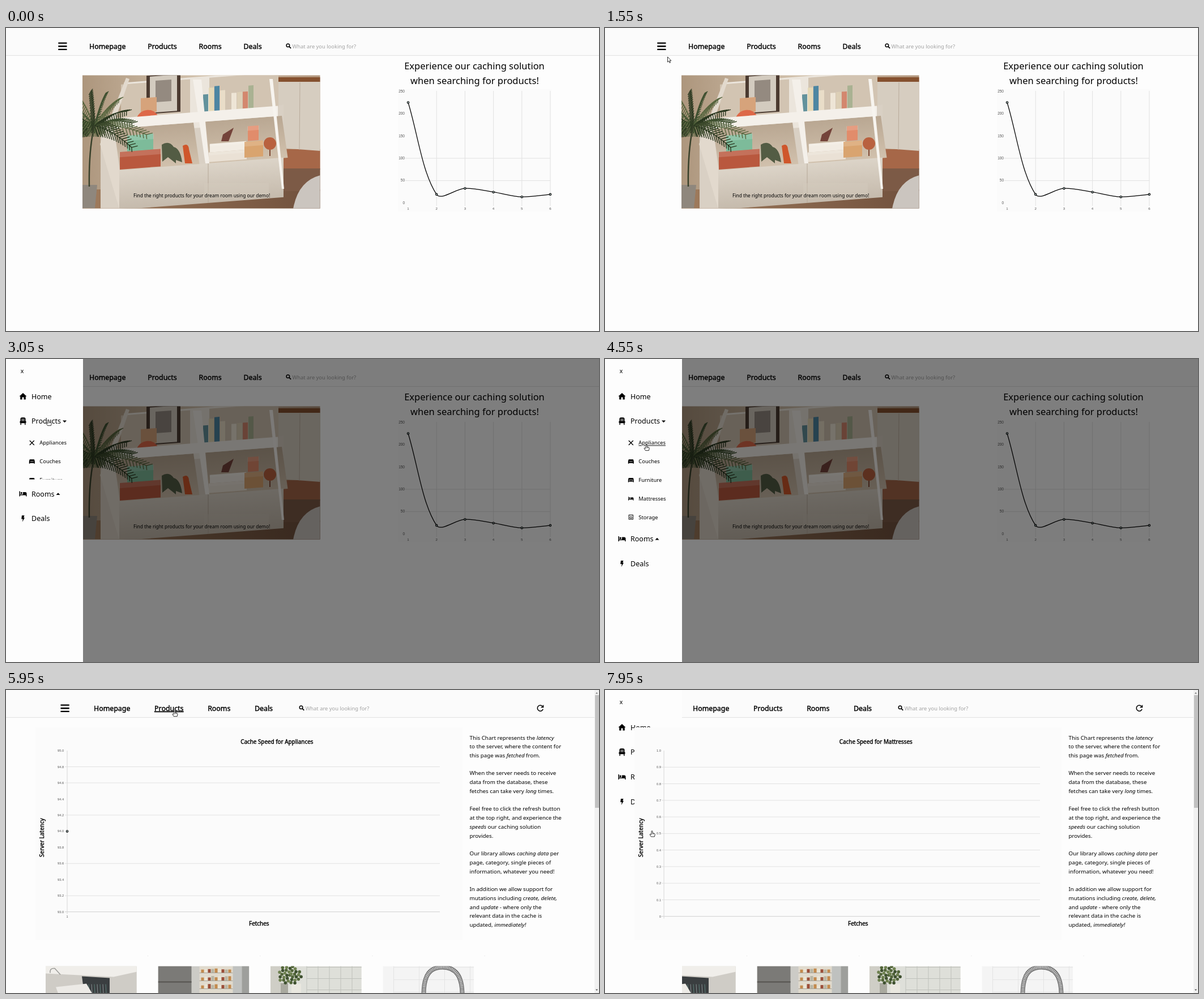
Animation, 1047 px wide and 535 px high, one loop 8000 ms. Source, as an HTML page:

```html
<!DOCTYPE html>
<html lang="en">
<head>
<meta charset="utf-8">
<title>Shop demo with cached fetches</title>
<style>
html, body { margin: 0; width: 100%; height: 100%; overflow: hidden; background: #fdfdfd; }
svg { display: block; width: 100vw; height: 100vh; font-family: "Noto Sans", "Open Sans", sans-serif; }
.tick { font-family: "Liberation Sans", Arial, sans-serif; fill: #555; }
.strong { stroke: #000; stroke-width: .4; }
.hover { text-decoration: underline; }
</style>
</head>
<body>
<svg id="stage" viewBox="0 0 1047 535"></svg>
<script>
const LOOP = 8000, DRAWER = 136;
const clamp = v => Math.max(0, Math.min(1, v));
const ease = v => v * v * (3 - 2 * v);
const ramp = (t, from, length) => ease(clamp((t - from) / length));
// Switches on and off in turn, starting at each given time
const toggle = (t, length, ...times) => times.reduce((v, from, i) => v + (i % 2 ? -1 : 1) * ramp(t, from, length), 0);

function seeded(seed) {
  return () => (seed = (seed * 16807) % 2147483647) / 2147483647;
}

// Markup helpers
const rect = (x, y, w, h, fill, more = '') => `<rect x="${x}" y="${y}" width="${w}" height="${h}" fill="${fill}" ${more}/>`;
const line = (x1, y1, x2, y2, color = '#e1e1e1', w = 1) =>
  `<line x1="${x1}" y1="${y1}" x2="${x2}" y2="${y2}" stroke="${color}" stroke-width="${w}"/>`;
const path = (d, fill = '#000', more = '') => `<path d="${d}" fill="${fill}" ${more}/>`;
const stroke = (d, color, w, more = '') => path(d, 'none', `stroke="${color}" stroke-width="${w}" ${more}`);
const circle = (x, y, r, fill, more = '') => `<circle cx="${x}" cy="${y}" r="${r}" fill="${fill}" ${more}/>`;
const text = (x, y, size, s, more = '') => `<text x="${x}" y="${y}" font-size="${size}" ${more}>${s}</text>`;
const group = (transform, s) => `<g transform="${transform}">${s}</g>`;
const at = (x, y, s) => group(`translate(${x} ${y})`, s);
const range = (n, f) => Array.from({ length: n }, (_, i) => f(i)).join('');
const clip = (id, x, y, w, h, s) => `<clipPath id="${id}">${rect(x, y, w, h, '#000')}</clipPath><g clip-path="url(#${id})">${s}</g>`;
const gradient = (id, colors, dir = '') => `<linearGradient id="${id}" ${dir}>` +
  colors.map((c, i) => `<stop offset="${i / (colors.length - 1)}" stop-color="${c}"/>`).join('') + '</linearGradient>';
const dot = (x, y) => circle(x, y, 1.7, '#b9cfcd', 'stroke="#000" stroke-width="1.1"');
const middle = 'text-anchor="middle"', end = 'text-anchor="end"';

// Header: entries spaced by one gap, as in a flex row
const pen = document.createElement('canvas').getContext('2d');
pen.font = '12.4px "Noto Sans", "Open Sans", sans-serif';

function navLayout(x, gap) {
  const items = ['Homepage', 'Products', 'Rooms', 'Deals'].map(name => {
    const w = pen.measureText(name).width, item = { name, x, w };
    x += w + gap;
    return item;
  });
  return { items, bar: items[0].x - gap - 16, search: x + 4 };
}
const NAV = { home: navLayout(147, 38.8), shop: navLayout(155, 42.6) };

function header(page) {
  const { items, bar, search } = NAV[page];
  return rect(0, 0, 1047, 48, '#fbfbfb') + line(0, 48.5, 1047, 48.5, '#e2e2e2') +
    range(3, i => rect(bar, 25.4 + i * 5.7, 15.4, 2.3, '#000', 'rx=".7"')) +
    items.map((n, i) => text(n.x, 36.8, 12.4, n.name, `class="strong" id="${page}${i}"`)).join('') +
    at(search, 31, circle(3.4, -.3, 2.8, 'none', 'stroke="#000" stroke-width="1.5"') + line(5.4, 1.7, 8.6, 4.8, '#000', 1.8)) +
    text(search + 11, 35.5, 9.36, 'What are you looking for?', 'fill="#a2a2a2"');
}

// Home page
function palm() {
  const rnd = seeded(11);
  return range(13, n => {
    const turn = Math.PI * (1.12 - n / 10), len = 62 + 42 * rnd();
    const dx = Math.cos(turn) * len, dy = -Math.sin(turn) * len;
    const leaves = range(16, k => {
      const s = k / 15, x = dx * s, y = dy * s + 22 * s * s, size = 20 - 12 * s;
      return `M${x} ${y}l${dx / len * size * .6 - 4} ${size}M${x} ${y}l${dx / len * size + 3} ${-size * .35}`;
    });
    return at(156, 172, stroke(`M0 0Q${dx / 2} ${dy / 2} ${dx} ${dy + 22}${leaves}`, ['#2b3820', '#3f5030', '#56643d'][n % 3], 1.4));
  }) + stroke('M147 280Q146 215 156 172', '#38402a', 2.5);
}

// One row of books or boxes with seeded sizes
function row(x, floor, n, w, h, colors, seed) {
  const rnd = seeded(seed);
  return range(n, i => {
    const tall = h * (.65 + .35 * rnd());
    return rect(x + i * w, floor - tall, w - 1, tall, colors[i % colors.length]);
  });
}
const pile = (x, floor, w, h, color) => rect(x, floor - h, w, h, color) + rect(x - 1, floor - h, w + 2, h * .3, '#fff', 'opacity=".15"');

function shelf() {
  const bays = [-9, 147];
  return rect(-33, 158, 323, 161, '#d9d0c4') + rect(8, 97, 266, 90, '#ebe5dc') +
    bays.map(x => rect(x + 12, 100, 122, 60, '#d2c4b2') +
      at(x, 177, group('skewX(8)', rect(0, 0, 140, 75, 'url(#bay)')))).join('') +
    rect(248 - 200, 88, 60, 68, '#4b3a30') + rect(54, 90, 48, 64, '#d3cbbf') + rect(64, 98, 28, 38, '#948a80') +
    rect(38, 127, 28, 26, '#d6a37b') + path('M29 169a20 20 0 0 1 41 0Z', '#dd6848') +
    row(148, 160, 4, 10, 48, ['#63929c', '#e5d9b7', '#4d86a2', '#e9ddc8'], 5) + row(198, 160, 4, 10, 46, ['#eee5d6', '#dccfb6', '#d3876e', '#a9b292'], 8) +
    rect(-12, 159, 292, 18, '#f4f0ea') + rect(0, 251, 290, 70, 'url(#front)') + line(157, 251, 157, 321, '#b5a797') +
    pile(14, 223, 46, 32, '#7dbb9a') + pile(1, 250, 72, 31, '#b9583e') +
    pile(160, 232, 64, 15, '#f2ece3') + pile(158, 249, 67, 17, '#eae1d5') +
    pile(227, 217, 19, 26, '#e18c6b') + pile(221, 246, 33, 28, '#d9a46f');
}

function roomPhoto() {
  const toys = path('M275 206Q288 198 296 210Q308 213 311 237L300 233V239L286 228 276 236Z', '#535c44') +
    path('M312 208Q322 202 323 214L329 239H316Z', '#cf562b') +
    path('M402 176L393 200H380L383 188Z', '#74433a') + circle(466, 204, 11, '#b9613f') + line(466, 215, 466, 226, '#7e4934', 2);
  return gradient('wall', ['#ad967d', '#d3c3ae', '#b2967d']) + gradient('bay', ['#b9a792', '#d1c1ad'], 'x2="0" y2="1"') +
    gradient('front', ['#dcd4c8', '#c5baac'], 'x2="0" y2="1"') + gradient('floor', ['#a07c5d', '#6f4f3c']) +
    clip('room', 135, 83.5, 419.5, 235, rect(135, 83, 420, 236, 'url(#wall)') + rect(135, 285, 420, 34, 'url(#floor)') +
      rect(480, 214, 75, 36, '#a66748') + rect(478, 248, 77, 40, '#7c5a46') +
      path('M474 94H555V217L487 212Z', '#d6cdc0') + line(519, 96, 518, 215, '#b9ab9b') + rect(474, 87, 81, 8, '#85512f') +
      group('translate(200) skewY(-4.4)', shelf()) +
      path('M330 91H345L359 239H352Z', '#f4f0ea') + path('M465 90H471L491 284H487Z', '#f7f4ef') + path('M212 88L166 205 200 319V250L190 170 218 90Z', '#e2d9cd') +
      toys + rect(350, 274, 114, 26, '#d3c9bd', 'opacity=".45"') + path('M507 319Q516 270 555 260V319Z', '#cbc5bf') +
      path('M135 277H161L157 318H135Z', '#8f877d') + palm()) +
    text(225, 299, 8.36, 'Find the right products for your dream room using our demo!');
}

// Cubic spline with tension scaled by neighbour distance
function spline(pts, tension) {
  const handles = pts.map((p, i) => {
    const a = pts[i - 1] || p, b = pts[i + 1] || p;
    const da = Math.hypot(p[0] - a[0], p[1] - a[1]), db = Math.hypot(b[0] - p[0], b[1] - p[1]);
    const handle = d => p.map((v, k) => v + tension * d / (da + db) * (b[k] - a[k]));
    return [handle(-da), handle(db)];
  });
  return 'M' + pts[0] + pts.slice(1).map((p, i) => `C${handles[i][1]} ${handles[i + 1][0]} ${p}`).join('');
}

function homeChart() {
  const y = ms => 308.8 - ms * .788, x = i => 710 + i * 50.2;
  const pts = [225, 19, 32.5, 24.3, 13.5, 19].map((ms, i) => [x(i), y(ms)]);
  return rect(692, 108, 271, 216, '#fbfbfb') +
    range(5, i => line(x(i + 1), 111, x(i + 1), 314)) + [50, 100].map(ms => line(705, y(ms), 961, y(ms))).join('') +
    range(6, i => text(704, y(i * 50) + 2, 6.5, i * 50, `class="tick" ${end}`) + text(x(i), 320.8, 6.2, i + 1, `class="tick" ${middle}`)) +
    stroke(spline(pts, .33), '#000', 1.25) + pts.map(p => dot(...p)).join('');
}

const homePage = () => header('home') + roomPhoto() +
  text(827, 73, 16.5, 'Experience our caching solution', middle) +
  text(827.5, 99.3, 16.5, 'when searching for products!', middle) + homeChart();

// Category page
const NOTES = `This Chart represents the *latency*
to the server, where the content for
this page was *fetched* from.

When the server needs to receive
data from the database, these
fetches can take very *long* times.

Feel free to click the refresh button
at the top right, and experience the
*speeds* our caching solution
provides.

Our library allows *caching data* per
page, category, single pieces of
information, whatever you need!

In addition we allow support for
mutations including *create, delete,*
and *update* - where only the
relevant data in the cache is
updated, *immediately!*`.split('\n');
const italic = s => s.replace(/\*(.+?)\*/g, '<tspan font-style="italic">$1</tspan>');

// Product photos in their own coordinates, 161 by 48
const tiles = (x, w, h, color) => range(8, i => line(x + i * w, 0, x + i * w, 48, color) + line(x, i * h + 2, 161, i * h + 2, color));
const PHOTOS = [
  () => rect(0, 0, 161, 48, '#cfccc6') + path('M0 0H161V10L120 19 0 13Z', '#f0eeea') + stroke('M8 12Q7 3 16 4L26 15', '#9c9c98', 1.5) +
    path('M64 18L113 21V48H68Z', '#3a3e40') + range(8, i => line(71 + i * 5, 32, 72 + i * 5, 48, i % 2 ? '#5c7f78' : '#878e90')) +
    path('M18 37L72 31 82 48H22Z', '#eceae6'),
  () => rect(0, 0, 161, 48, '#cccbc6') + rect(0, 0, 59, 48, '#7b7a77') + line(0, 28, 59, 28, '#55524f', 2) + rect(73, 0, 60, 48, '#e0dacd') +
    range(3, i => row(76, 12 + i * 14, 9, 6, 9, ['#c38a4d', '#e9e4d5', '#9b4e38', '#b8b6a5'], 3 + i) + line(73, 12 + i * 14, 132, 12 + i * 14, '#a8a398')) +
    rect(132, 0, 16, 48, '#bfc1bf') + rect(148, 0, 13, 48, '#9e9f9c'),
  () => rect(0, 0, 161, 48, '#dedfd9') + tiles(64, 20, 20, '#bfc1bb') + rect(0, 0, 18, 48, '#cfcec6') + rect(18, 30, 13, 18, '#a9a99f') + rect(37, 31, 17, 17, '#e9e7df') +
    range(34, i => circle(34 + Math.sin(i * 2.4) * Math.sqrt(i) * 3.6, 16 + Math.cos(i * 2.4) * Math.sqrt(i) * 2.9, 2.8, ['#53663a', '#6f8251', '#3f5130'][i % 3])),
  () => rect(0, 0, 161, 48, '#f4f4f4') + tiles(19, 45, 22, '#e4e4e4') + ['#777', '#d5d5d5'].map((c, i) =>
    stroke('M72 50C72 14 84 2 105 2C130 2 140 20 140 50', c, 8 - i * 3, i ? 'stroke-dasharray="1.3 1.4"' : '')).join('')
];

function shopPage() {
  return header('shop') + stroke('M947.6 29.2A5.1 5.1 0 1 0 948.2 33.8', '#000', 1.6) + path('M949.3 26V31.3H944Z') +
    NOTES.map((s, i) => text(818.5, 87.5 + i * 15.74, 9.77, italic(s))).join('') +
    PHOTOS.map((photo, i) => at(70 + i * 198.5, 487.5, clip('photo' + i, 0, 0, 160.7, 48, photo()))).join('') +
    range(4, i => rect(250 + i * 198.2, 469, 1, 1, '#dcdcdc')) +
    rect(1039, 0, 8, 535, '#f1f1f1') + rect(1040, 9, 7, 199, '#c1c1c1') + path('M1041 6.5h4l-2-2.5z', '#777') + path('M1041 528.5h4l-2 2.5z', '#555');
}

function axes(x, step, right, rows, label, labelX) {
  const y = i => 107 + i * step;
  return rows.map(i => line(x - 4, y(i), right, y(i), i === 10 ? '#d0d0d0' : '#e2e2e2')).join('') +
    line(x, y(0), x, y(10) + 4, '#d8d8d8') + range(11, i => text(labelX, y(i) + 2.1, 5.8, label(i), `class="tick" ${end}`));
}

const card = () => rect(52, 66, 754, 375, '#fbfbfb') + text(478.3, 94.6, 9.9, '', `id="title" class="strong" ${middle}`) +
  text(446.8, 415.8, 9.95, 'Fetches', `class="strong" ${middle}`) +
  group('translate(67 260.7) rotate(-90)', text(0, 0, 9.95, 'Server Latency', `class="strong" ${middle}`)) +
  `<g id="empty">${axes(104, 29.27, 768, [...Array(11).keys()].slice(1), i => i === 10 ? 0 : (1 - i / 10).toFixed(1), 99)}</g>` +
  `<g id="single">${axes(108, 28.47, 766, [1, 2, 4, 7, 9, 10], i => (95 - i / 5).toFixed(1), 102.3)}
    ${text(108, 401.5, 5.5, 1, `class="tick" ${middle}`)}${dot(108, 249.4)}</g>`;

// Drawer
const SUBS = ['Appliances', 'Couches', 'Furniture', 'Mattresses', 'Storage'];
const subY = i => 148 + i * 32.8, FOLD = SUBS.length * 32.8;
const CARET = { up: 'M-3.5 2H3.5L0 -1.8Z', down: 'M-3.5 -1.5H3.5L0 2.3Z' };
const couch = path('M-4 -3.5H4Q5 -1 5 1V4H3.5V3H-3.5V4H-5V1Q-5 -1 -4 -3.5Z');
const bed = path('M-6.5 -4.5H-5V1H0V-3H4Q6.5 -3 6.5 0V4.5H5V2.5H-5V4.5H-6.5Z') + circle(-2.7, -1.4, 1.7, '#000');
const home = path('M0 -6L6.5 0H4.8V5.6H1.4V1.5H-1.4V5.6H-4.8V0H-6.5Z');
const chair = path('M-4.5 0V-4Q-4.5 -6.5 -2 -6.5H2Q4.5 -6.5 4.5 -4V0H5.5V3H4.5V6.5H3V3.5H-3V6.5H-4.5V3H-5.5V0Z') + stroke('M-1.9 -4.5V0M0 -4.5V0M1.9 -4.5V0', '#fff', .8);
const bolt = path('M-2 -5.5H2.5L1.2 -1.6H3L-1.2 5.8L-.3 .6H-2.8Z');
const subIcons = [stroke('M-4 -4L4 4M4 -4L-4 4', '#000', 1.3), couch + line(-3, 0, 3, 0, '#fff', .7), couch + stroke('M-3 2V0H3V2', '#fff', .7),
  group('scale(.72)', bed), rect(-3.6, -3.8, 7.2, 7.6, 'none', 'stroke="#000"') + circle(0, .6, 1.7, 'none', 'stroke="#000"')];
const entry = (i, icon, s) => at(30, 66 + i * 43.8, icon + text(15, 4.6, 12.5, s));

const drawer = () => rect(0, 0, DRAWER, 535, '#fdfdfd') + text(28.5, 25.4, 10.5, 'x', middle) +
  entry(0, home, 'Home') + entry(1, chair, 'Products') + at(103.5, 110, '<path id="caret"/>') +
  clip('fold', 0, 128, DRAWER, FOLD, SUBS.map((s, i) => at(45.8, subY(i), subIcons[i] + text(13.5, 3.4, 9.4, s, `id="sub${i}"`))).join('')) +
  `<g id="tail">${entry(2, bed, 'Rooms')}${at(92, 153.5, path(CARET.up))}${entry(3, bolt, 'Deals')}</g>`;

const outline = 'stroke="#000" stroke-width=".8" stroke-linejoin="round"';
const arrow = path('M0 0V9.2L2.1 7.3L3.5 10.6L5 10L3.6 6.8H6.4Z', '#fff', outline);
const hand = path('M-1 1Q0 -.6 1 1V4.2L4.2 5Q5.4 5.4 5.2 7L4.4 10.6H-1.6L-4 6.6Q-3.6 5 -1 6.8Z', '#fff', outline) +
  stroke('M1.2 4.4V6.6M2.8 4.8V6.6', '#000', .5);

document.getElementById('stage').innerHTML = rect(0, 0, 1047, 535, '#fdfdfd') +
  `<g id="home">${homePage()}</g><g id="shop">${shopPage()}<g id="back"><g id="card">${card()}</g></g></g>` +
  rect(0, 0, 1047, 535, '#000', 'id="dim"') + `<g id="drawer">${drawer()}</g><g id="top"></g>` +
  `<g id="cursor"><g id="arrow">${arrow}</g><g id="hand">${hand}</g></g>`;

const $ = id => document.getElementById(id);
const set = (id, name, value) => $(id).setAttribute(name, value);
const show = (id, on) => set(id, 'display', on ? 'inline' : 'none');

// Pointer moves: start, length, place
const menu = [98, 31], products = [75, 107], shelfBox = [220, 225];
const MOVES = [[50, 800, shelfBox], [950, 750, menu], [2400, 500, products], [3500, 750, [73, subY(0) + 3]],
  [5250, 700, [298, 36]], [5950, 50, menu], [6100, 180, products], [6350, 150, [220, 166]],
  [6900, 400, [95, subY(3) + 14]], [7350, 350, [83, subY(3) + 2]]];
const pointer = t => MOVES.reduce((p, [from, length, to]) => {
  const k = ramp(t, from, length);
  return p.map((v, i) => v + (to[i] - v) * k);
}, [1028, 440]);

function draw(t) {
  const inShop = t >= 4750, mattresses = t >= 7930, empty = mattresses || t < 5150;
  const slide = toggle(t, 200, 2100, 4800, 6080);
  const dim = toggle(t, 100, 1750, 4650, 5950, 7830);
  const fold = toggle(t, 100, 3000, 4650, 6330, 7850);

  show('home', !inShop);
  show('shop', inShop);
  show('empty', empty);
  show('single', !empty);
  $('title').textContent = 'Cache Speed for ' + (mattresses ? 'Mattresses' : 'Appliances');
  // A fresh chart is painted above the closing drawer
  const layer = $(inShop && empty && (mattresses || slide > 0) ? 'top' : 'back');
  if ($('card').parentNode !== layer) layer.appendChild($('card'));

  set('dim', 'width', inShop ? 1039 : 1047);
  set('dim', 'opacity', dim / 2);
  show('drawer', slide > 0);
  set('drawer', 'transform', `translate(${DRAWER * (slide - 1)} 0)`);
  set('tail', 'transform', `translate(0 ${FOLD * fold})`);
  $('fold').firstChild.setAttribute('height', FOLD * fold);
  set('caret', 'd', fold > .5 ? CARET.down : CARET.up);

  const [x, y] = pointer(t), page = inShop ? 'shop' : 'home';
  const near = (left, w, mid, h) => x > left && x < left + w && Math.abs(y - mid) < h;
  const closed = slide === 0, open = slide > .9;
  const underline = (id, on, base) => {
    set(id, 'class', on ? base + ' hover' : base);
    return on;
  };
  const hits = [
    !open && near(NAV[page].bar - 4, 24, 32, 10), !closed && near(20, 90, 110, 12),
    ...NAV[page].items.map((n, i) => underline(page + i, closed && dim < .05 && near(n.x, n.w, 32, 9), 'strong')),
    ...SUBS.map((_, i) => underline('sub' + i, open && fold > .9 && near(58, 51, subY(i), 8), '')),
    inShop && empty
  ];
  const link = hits.some(Boolean);
  show('cursor', t >= 50);
  set('cursor', 'transform', `translate(${x} ${y})`);
  show('arrow', !link);
  show('hand', link);
}

const start = performance.now();
function tick() {
  draw((performance.now() - start) % LOOP);
  requestAnimationFrame(tick);
}
draw(0);
requestAnimationFrame(tick);
</script>
</body>
</html>
```
